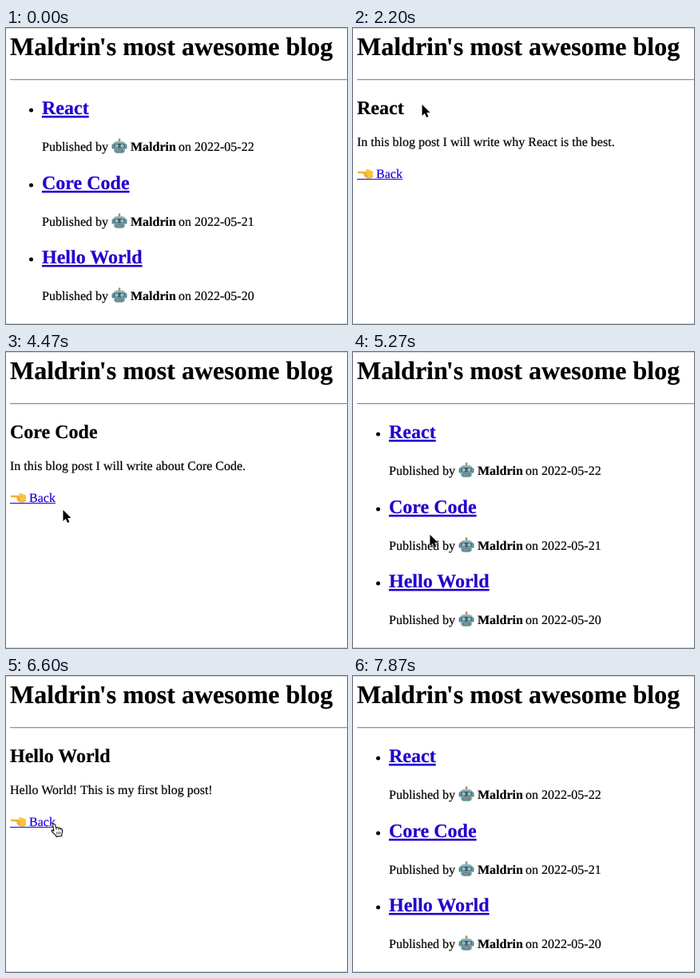
These frames come from a looping animation (427 by 371 pixels, 8000 ms). An HTML page:

```html
<!DOCTYPE html>
<html lang="en">
<head>
<meta charset="utf-8">
<title>Blog</title>
<style>
  html, body { margin: 0; width: 100%; height: 100%; overflow: hidden; background: #fff; }
  svg { display: block; }
  #stage { width: 427px; height: 371px; font: 16px 'Liberation Serif', 'Times New Roman', Times, serif; }
  text { text-rendering: geometricPrecision; stroke: #000; stroke-width: .2px; }
  .title { font-size: 32px; font-weight: bold; }
  .head { font-size: 24px; font-weight: bold; }
  .link { fill: #2300cc; stroke: #2300cc; }
  .name { font-weight: bold; }
  .back { fill: #1c00dd; stroke: #1c00dd; }
  .link { text-decoration: underline 1.6px; text-underline-offset: 1.6px; }
</style>
</head>
<body>
<svg id="stage" viewBox="0 0 427 371">
  <defs>
    <g id="robot">
      <path d="M10 5V3" stroke="#4f666c" stroke-width="1.6"/>
      <circle cx="10" cy="2.2" r="1.5" fill="#c48a58"/>
      <rect x=".6" y="8" width="3" height="6" rx="1.3" fill="#55747d"/>
      <rect x="16.4" y="8" width="3" height="6" rx="1.3" fill="#55747d"/>
      <path d="M1.6 9.5Q2 4.3 10 4.3T18.4 9.5Q18.2 13 16.8 14.5V17Q16 19.4 13.5 19.4H6.5Q4 19.4 3.2 17V14.5Q1.8 13 1.6 9.5Z" fill="#7ba4ad"/>
      <path d="M4 7Q6 5.3 10 5.3T16 7" fill="none" stroke="#a9c8ce"/>
      <rect x="3" y="7.6" width="14" height="5.4" rx="2.7" fill="#3f5d66"/>
      <g fill="#54c3d4" stroke="#cfe3e7" stroke-width=".8">
        <circle cx="6.5" cy="10.3" r="1.7"/>
        <circle cx="13.5" cy="10.3" r="1.7"/>
      </g>
      <path d="M10 11.5L11.2 13.8H8.8Z" fill="#a8604e"/>
      <rect x="5.4" y="15" width="9.2" height="2.8" rx="1.2" fill="#42555c"/>
      <path d="M6.5 16.4H13.5" stroke="#d8e0e2" stroke-width="1.3" stroke-dasharray="1.4 .6"/>
    </g>
    <g id="point-left">
      <path d="M1 4.2Q-.3 5.6 1.2 6.6L8.3 7Q7.6 8.6 8.6 9.5Q8.2 11.2 9.5 12Q9.7 14 12 14.2H16.5L20 12.4V4.5L15.5 2.2Q12.8 .6 11.2 1.4Q10.4 2 11.8 3.3L12.6 4.2Z" fill="#fbc43a"/>
      <path d="M1.2 6.6L12 7M8.7 9.6H13M9.6 12H13M12 14.2H16.5L20 12.4" fill="none" stroke="#d48a1e" stroke-width=".8"/>
    </g>
    <path id="arrow" d="M.5 0V14L3.8 11L6 16L8.4 15L6.2 10.1H10.5Z" fill="#000" stroke="#fff" stroke-width="1" stroke-linejoin="round" paint-order="stroke"/>
    <g id="hand" transform="translate(-.5 0) scale(.88)" fill="#fff" stroke="#000" stroke-width="1.2" stroke-linejoin="round" stroke-linecap="round">
      <path d="M-1.8 10.7L-3.2 2Q-3.2 .3 -1.8 .2T.1 1.6L1.4 6.2Q3.6 4.6 4.7 6.4Q6.6 5.2 7.6 7.3Q10 6.6 10.3 9.3Q10.5 13 9.4 15.3L9.6 17.6L1.6 18.6L1 16.6Q-2 14 -4.7 11.2Q-5.6 9.3 -4 9Q-2.8 9.2 -1.8 10.7Z"/>
      <path d="M1.4 6.4L1.8 8.8M4.7 6.6L5 9M7.6 7.5L7.8 9.4M2.4 12.2L2.8 15.2M4.8 12L5.1 15M7.1 11.7L7.3 14.6" stroke-width=".8"/>
    </g>
  </defs>
  <rect width="427" height="371" fill="#fff"/>
  <path d="M0 .5H427M0 370.5H427" stroke="#d4d4d4"/>
  <text class="title" x="5" y="34">Maldrin<tspan dx="-2">'s most awesome blog</tspan></text>
  <path d="M5 64.5H427" stroke="#8e8e8e"/>
  <path d="M5 65.5H427" stroke="#e2e2e2"/>
  <g id="list"></g>
  <g id="post">
    <text class="head" id="post-title" x="5" y="108"></text>
    <text id="post-body" x="5" y="148"></text>
    <use href="#point-left" transform="translate(5 176) scale(1 .84)"/>
    <text class="back" x="29" y="188">Back</text>
    <path d="M5 189.5H62" stroke="#1c00dd"/>
  </g>
  <use id="cursor" href="#arrow"/>
</svg>
<script>
const LOOP = 8000, STEP = 1000 / 15;
const byId = id => document.getElementById(id);

const posts = {
  react: ['React', 'In this blog post I will write why React is the best.', '2022-05-22', 108],
  core: ['Core Code', 'In this blog post I will write about Core Code.', '2022-05-21', 202],
  hello: ['Hello World', 'Hello World! This is my first blog post!', '2022-05-20', 295],
};

// start time, page, how long the previous hover state lingers
const visits = [
  [0, 'list', 0], [2060, 'react', 0], [3460, 'list', 0], [4060, 'core', 400],
  [4925, 'list', 0], [5525, 'hello', 270], [6795, 'list', 0],
];

// time, x, y of the pointer tip
const track = [
  [0, 252, 385], [930, 252, 385], [1000, 250, 362], [1267, 230, 200],
  [1530, 58, 106], [1800, 86, 96], [2730, 86, 96], [3070, 38, 172],
  [3330, 51, 175], [3730, 51, 175], [3930, 71, 198], [4600, 71, 198],
  [4800, 53, 185], [5000, 53, 185], [5267, 96, 229], [5467, 129, 288],
  [6000, 129, 288], [6400, 53, 178], [6600, 62, 185], [7270, 62, 185],
  [7600, 44, 140], [7790, 9, 94], [7860, -20, 84], [8000, -20, 84],
];

byId('list').innerHTML = Object.values(posts).map(([title, , date, y]) => `
  <circle cx="31.5" cy="${y - 5}" r="2.5"/>
  <text class="head link" x="45" y="${y}">${title}</text>
  <text x="45" y="${y + 46}">Published by</text>
  <use href="#robot" x="132" y="${y + 29.5}"/>
  <text class="name" x="156" y="${y + 46}">Maldrin</text>
  <text x="216" y="${y + 46}">on ${date}</text>`).join('');

// Zero at the ends of a rest, so each move eases out and in
function slope(i, k) {
  const a = track[i - 1], b = track[i], c = track[i + 1];
  if (!a || !c || a[k] === b[k] || b[k] === c[k]) return 0;
  return (c[k] - a[k]) / (c[0] - a[0]);
}

function pointerAt(t) {
  const i = track.findLastIndex(p => p[0] <= t);
  const p = track[i], q = track[i + 1];
  if (!q) return p.slice(1);
  const d = q[0] - p[0], u = (t - p[0]) / d, v = 1 - u;
  return [1, 2].map(k =>
    p[k] * (1 + 2 * u) * v * v + q[k] * u * u * (3 - 2 * u) +
    d * u * v * (slope(i, k) * v - slope(i + 1, k) * u));
}

function overLink(page, x, y) {
  if (page !== 'list') return x >= 5 && x <= 64 && y >= 174 && y <= 192;
  return x >= 45 && Object.values(posts).some(p => y >= p[3] - 22 && y <= p[3] + 6);
}

function draw() {
  const t = Math.floor((performance.now() % LOOP) / STEP + 0.001) * STEP;
  const n = visits.findLastIndex(v => v[0] <= t);
  const [start, page, linger] = visits[n];
  const isList = page === 'list';
  byId('list').style.display = isList ? '' : 'none';
  byId('post').style.display = isList ? 'none' : '';
  if (!isList) {
    byId('post-title').textContent = posts[page][0];
    byId('post-body').textContent = posts[page][1];
  }
  const [x, y] = pointerAt(t);
  const hoverPage = t - start < linger ? visits[n - 1][1] : page;
  const cursor = byId('cursor');
  cursor.setAttribute('href', overLink(hoverPage, x, y) ? '#hand' : '#arrow');
  cursor.setAttribute('transform', `translate(${x.toFixed(1)} ${y.toFixed(1)})`);
  requestAnimationFrame(draw);
}
draw();
</script>
</body>
</html>
```
